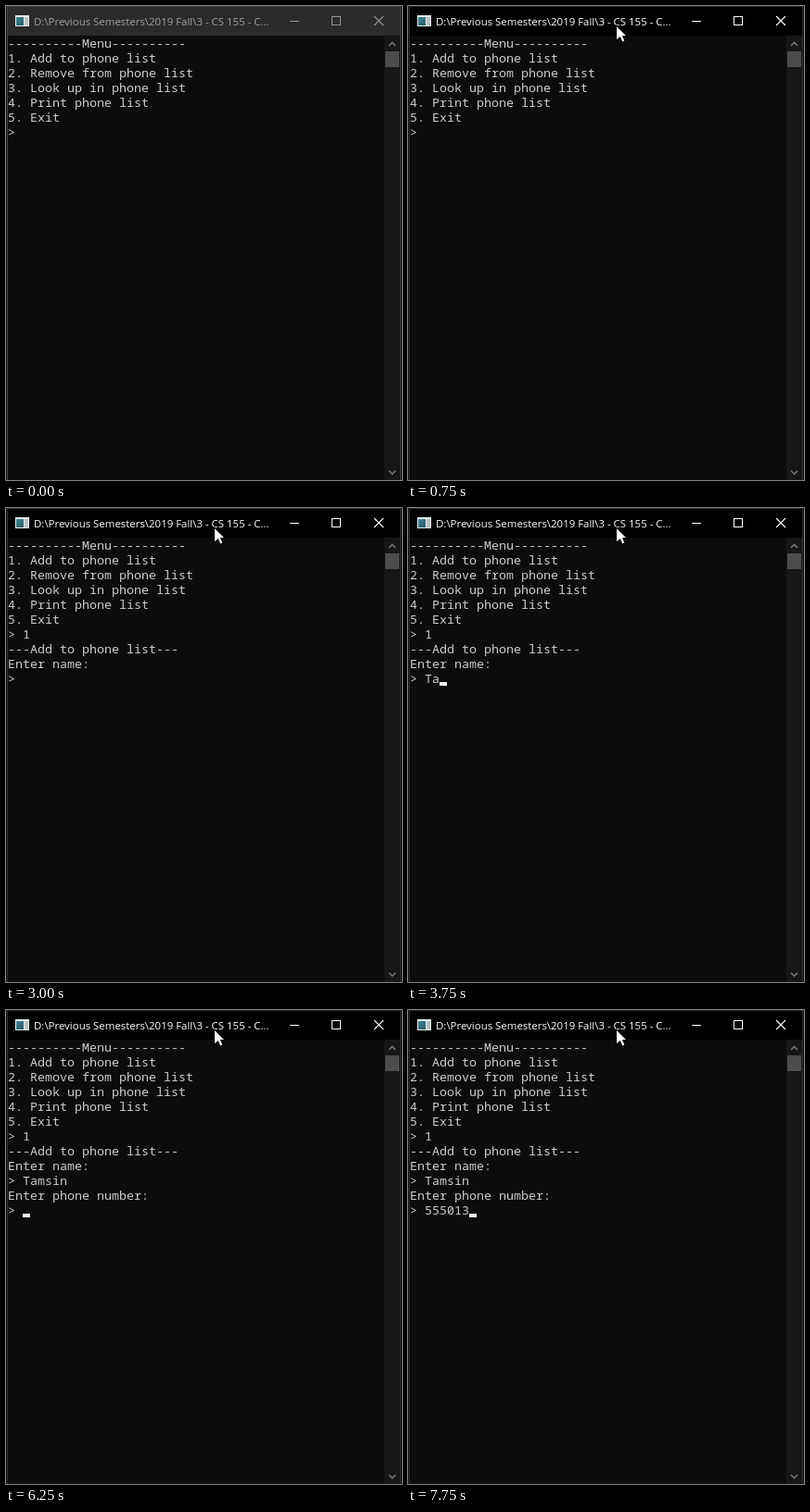
An HTML page with a canvas for the animation above (8000 ms loop, 427x512 px).

```html
<!DOCTYPE html>
<html lang="en">
<head>
<meta charset="utf-8">
<title>Phone list console</title>
<style>
html, body { margin: 0; width: 100%; height: 100%; overflow: hidden; background: #0c0c0c; }
canvas { display: block; width: 427px; height: 512px; }
</style>
</head>
<body>
<canvas id="stage" width="427" height="512"></canvas>
<script>
const ctx = document.getElementById('stage').getContext('2d');
const W = 427, H = 512, LOOP = 8000;
const CELL_W = 8, CELL_H = 16, LEFT = 2, TOP = 32;
const MONO = '13.333px "Noto Sans Mono", "DejaVu Sans Mono", monospace';
const SANS = '11.44px "Open Sans", "Noto Sans", sans-serif';
const TITLE = 'D:\\Previous Semesters\\2019 Fall\\3 - CS 155 - C...';
const FOCUS_AT = 750;

const MENU = [
  '----------Menu----------',
  '1. Add to phone list',
  '2. Remove from phone list',
  '3. Look up in phone list',
  '4. Print phone list',
  '5. Exit',
  '> '
].join('\n');

// Console output: [time, appended text]
const OUTPUT = [
  [0, MENU],
  [2000, '1'],
  [2250, '\n---Add to phone list---\nEnter name:\n> '],
  [3250, 'T'], [3750, 'a'], [4000, 'msi'], [4250, 'n'],
  [4750, '\nEnter phone number:\n> '],
  [6500, '5'], [6750, '5'], [7000, '5'], [7500, '0'], [7750, '13']
];

// Times at which the caret flips, starting hidden
const CARET = [1250, 3000, 3250, 3500, 3750, 4500, 4750, 5500, 6250, 7250, 7500];

// Pointer tip: [time, x, y]
const POINTER = [[250, 208, 202], [500, 218, 42], [750, 225, 22]];

function rect(x, y, w, h, color) {
  ctx.fillStyle = color;
  ctx.fillRect(x, y, w, h);
}

function line(points, color, width = 1) {
  ctx.beginPath();
  points.forEach(([x, y]) => ctx.lineTo(x, y));
  ctx.strokeStyle = color;
  ctx.lineWidth = width;
  ctx.stroke();
}

function text(str, x, y, font, color) {
  ctx.font = font;
  ctx.fillStyle = color;
  ctx.fillText(str, x, y);
}

function drawIcon() {
  rect(10, 10, 15, 12, '#e9eded');
  const shade = ctx.createLinearGradient(11, 12, 19, 21);
  shade.addColorStop(0, '#3f8793');
  shade.addColorStop(1, '#2c5a68');
  rect(11, 12, 8, 9, shade);
  rect(20, 12, 4, 9, '#b9c3c5');
}

function drawTitleBar(active) {
  const ink = active ? '#ffffff' : '#969696';
  rect(0, 0, W, TOP, active ? '#000000' : '#2b2b2b');
  drawIcon();
  text(TITLE, 30, 21, SANS, active ? '#ffffff' : '#a0a0a0');
  rect(306, 16, 10, 1, ink);
  ctx.strokeStyle = ink;
  ctx.lineWidth = 1;
  ctx.strokeRect(351.5, 11.5, 9, 9);
  line([[397, 11], [407, 21]], ink, 1.1);
  line([[407, 11], [397, 21]], ink, 1.1);
}

function drawScrollBar() {
  rect(408, TOP, 17, H - TOP, '#171717');
  rect(409, 49, 15, 17, '#4d4d4d');
  line([[413, 43], [416.5, 39.5], [420, 43]], '#737373', 1.6);
  line([[413, 502], [416.5, 505.5], [420, 502]], '#737373', 1.6);
}

function drawBorder(active) {
  const edge = active ? '#2c2c2c' : '#404040';
  rect(0, 0, W, 1, edge);
  rect(0, 0, 1, H, active ? '#161616' : '#1c1c1c');
  rect(1, 0, 1, H, edge);
  rect(425, 0, 1, H, edge);
  rect(426, 0, 1, H, '#161616');
}

function drawConsole(t) {
  const rows = OUTPUT.filter(([at]) => t >= at).map(([, s]) => s).join('').split('\n');
  rows.forEach((row, i) => text(row, LEFT, TOP + i * CELL_H + 13, MONO, '#cccccc'));
  if (CARET.filter(at => t >= at).length % 2) {
    const last = rows.length - 1;
    rect(LEFT + rows[last].length * CELL_W, TOP + last * CELL_H + 12, CELL_W, 4, '#f2f2f2');
  }
}

function drawPointer(t) {
  const spot = POINTER.filter(([at]) => t >= at).pop();
  if (!spot) return;
  ctx.save();
  ctx.translate(spot[1], spot[2]);
  ctx.beginPath();
  [[0, 0], [10, 10], [5.9, 10.2], [8.4, 15.4], [6.2, 16.4], [3.8, 11], [0, 14.2]]
    .forEach(([x, y]) => ctx.lineTo(x, y));
  ctx.closePath();
  ctx.strokeStyle = '#000000';
  ctx.lineWidth = 1.6;
  ctx.stroke();
  ctx.fillStyle = '#ffffff';
  ctx.fill();
  ctx.restore();
}

function draw(t) {
  const active = t >= FOCUS_AT;
  rect(0, 0, W, H, '#0c0c0c');
  drawTitleBar(active);
  drawScrollBar();
  drawBorder(active);
  drawConsole(t);
  drawPointer(t);
}

const start = performance.now();
function tick() {
  draw((performance.now() - start) % LOOP);
  requestAnimationFrame(tick);
}
tick();
</script>
</body>
</html>
```
